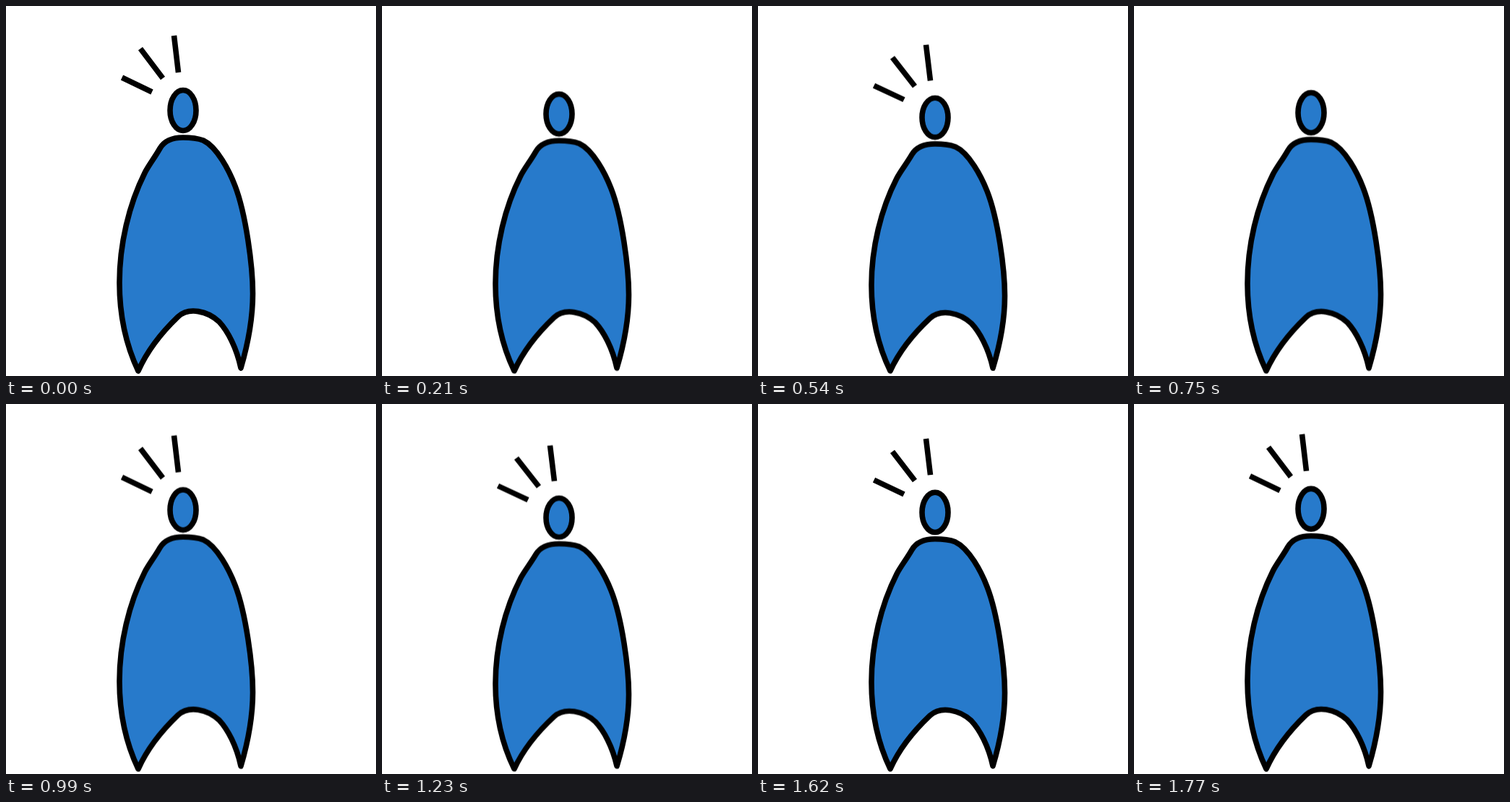
Write an HTML page that moves like this. It is 512x512 px and loops after 1.8 s.

```html
<!DOCTYPE html>
<html lang="en">
<head>
<meta charset="utf-8">
<title>Bouncing figure</title>
<style>
  html, body { margin: 0; width: 100%; height: 100%; overflow: hidden; background: #fff; }
  svg { display: block; width: 100vw; height: 100vh; }
  .figure {
    fill: #277acb;
    stroke: #000;
    stroke-width: 7.6;
    stroke-linejoin: round;
    transform-origin: 256px 505px;
    animation: squash 1800ms cubic-bezier(.37, 0, .63, 1) infinite;
  }
  .rays { fill: none; animation: blink 600ms step-end infinite; }

  /* Two dips per loop, the second one deeper */
  @keyframes squash {
    0%   { transform: scaleY(1); }
    25%  { transform: scaleY(.97); }
    50%  { transform: scaleY(.9982); }
    75%  { transform: scaleY(.9582); }
    100% { transform: scaleY(.9988); }
  }
  @keyframes blink {
    0%   { visibility: visible; }
    15%  { visibility: hidden; }
    50%  { visibility: visible; }
    100% { visibility: visible; }
  }
</style>
</head>
<body>
<svg viewBox="0 0 512 512">
  <g class="figure">
    <path class="rays" d="M160.5 99 L202 119 M186 59 L217 100 M232.5 41 L238.5 92"/>
    <ellipse cx="245" cy="144.5" rx="18" ry="28"/>
    <path d="M183 505
      C165 467 157 425 157 383
      C157 330 170 275 192 231
      C197 221 205 211 213 197
      C220 185 232 182 245 182
      C256 182 265 183 273 186
      C292 195 309 228 317 249
      C332 288 341.5 360 341.5 398
      C341.5 435 335 467 325 501
      C319 473 307 450 295 437
      C279 422 253 416 238 430
      C214 453 195 478 183 505 Z"/>
  </g>
</svg>
</body>
</html>
```
